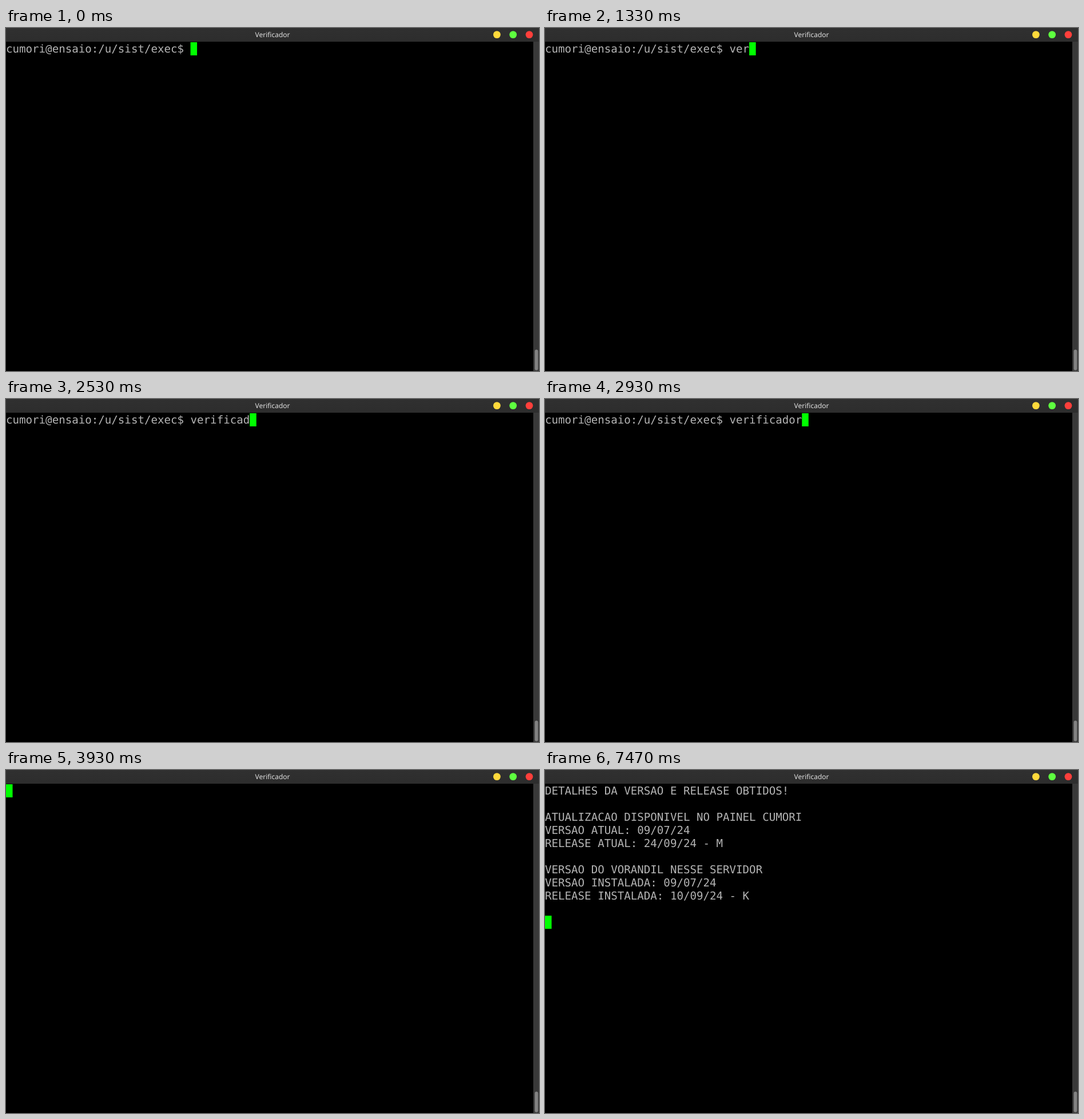
These frames come from a looping animation (932 px wide and 601 px high, 8000 ms). An HTML page with a canvas:

```html
<!DOCTYPE html>
<html lang="pt">
<head>
<meta charset="utf-8">
<title>Verificador</title>
<style>
  html, body { margin: 0; width: 100%; height: 100%; overflow: hidden; background: #000; }
  canvas { display: block; }
</style>
</head>
<body>
<canvas id="stage" width="932" height="601"></canvas>
<script>
const ctx = document.getElementById("stage").getContext("2d");
const LOOP = 8000;
const CELL = { width: 11.52, height: 23.04, top: 24.9, baseline: 18 };

const PROMPT = "cumori@ensaio:/u/sist/exec$ ";
const COMMAND = "verificador";
const KEY_TIMES = [870, 1070, 1330, 1670, 1870, 2070, 2200, 2400, 2530, 2670, 2930];

const CONNECTING = [
  "CONEXAO COM A INTERNET OK",
  "OBTENDO DETALHES DA VERSAO E RELEASE",
  ""
];
const DETAILS = [
  "DETALHES DA VERSAO E RELEASE OBTIDOS!",
  "",
  "ATUALIZACAO DISPONIVEL NO PAINEL CUMORI",
  "VERSAO ATUAL: 09/07/24",
  "RELEASE ATUAL: 24/09/24 - M",
  "",
  "VERSAO DO VORANDIL NESSE SERVIDOR",
  "VERSAO INSTALADA: 09/07/24",
  "RELEASE INSTALADA: 10/09/24 - K",
  "",
  ""
];

// The cursor always follows the last character of the last line.
function linesAt(time) {
  if (time >= 7470) return DETAILS;
  if (time >= 7000) return CONNECTING;
  if (time >= 3930) return [""];
  if (time >= 3800) return [PROMPT + COMMAND, ""];
  const typed = KEY_TIMES.filter(key => time >= key).length;
  return [PROMPT + COMMAND.slice(0, typed)];
}

function fillRect(color, x, y, width, height) {
  ctx.fillStyle = color;
  ctx.fillRect(x, y, width, height);
}

function drawWindow() {
  fillRect("#000", 0, 0, 932, 601);
  const bar = ctx.createLinearGradient(0, 0, 0, 24);
  bar.addColorStop(0, "#303030");
  bar.addColorStop(1, "#2d2d2d");
  fillRect(bar, 0, 0, 932, 24);

  ctx.font = '500 12px "Noto Sans", sans-serif';
  ctx.textAlign = "center";
  ctx.fillStyle = "#e0e0e0";
  ctx.fillText("Verificador", 466, 16);

  ["#ffd93b", "#5eff3f", "#ff3f3b"].forEach((color, i) => {
    ctx.fillStyle = color;
    ctx.beginPath();
    ctx.arc(858.4 + i * 28.3, 11.6, 6.4, 0, Math.PI * 2);
    ctx.fill();
  });

  fillRect("#393939", 922, 24, 10, 577);
  ctx.fillStyle = "#838383";
  ctx.beginPath();
  ctx.roundRect(924.6, 563.6, 5.8, 36, 2.9);
  ctx.fill();
}

function drawTerminal(lines) {
  ctx.font = '19.2px "DejaVu Sans Mono", monospace';
  ctx.textAlign = "left";
  ctx.fillStyle = "#b4b4b4";
  lines.forEach((line, row) => {
    const y = CELL.top + row * CELL.height + CELL.baseline;
    [...line].forEach((char, column) => ctx.fillText(char, column * CELL.width, y));
  });
  const row = lines.length - 1;
  fillRect("#00ff00", lines[row].length * CELL.width, CELL.top + row * CELL.height,
    CELL.width, CELL.height);
}

function draw(now) {
  ctx.textRendering = "geometricPrecision";
  drawWindow();
  drawTerminal(linesAt(now % LOOP));
  requestAnimationFrame(draw);
}
draw(performance.now());
</script>
</body>
</html>
```
